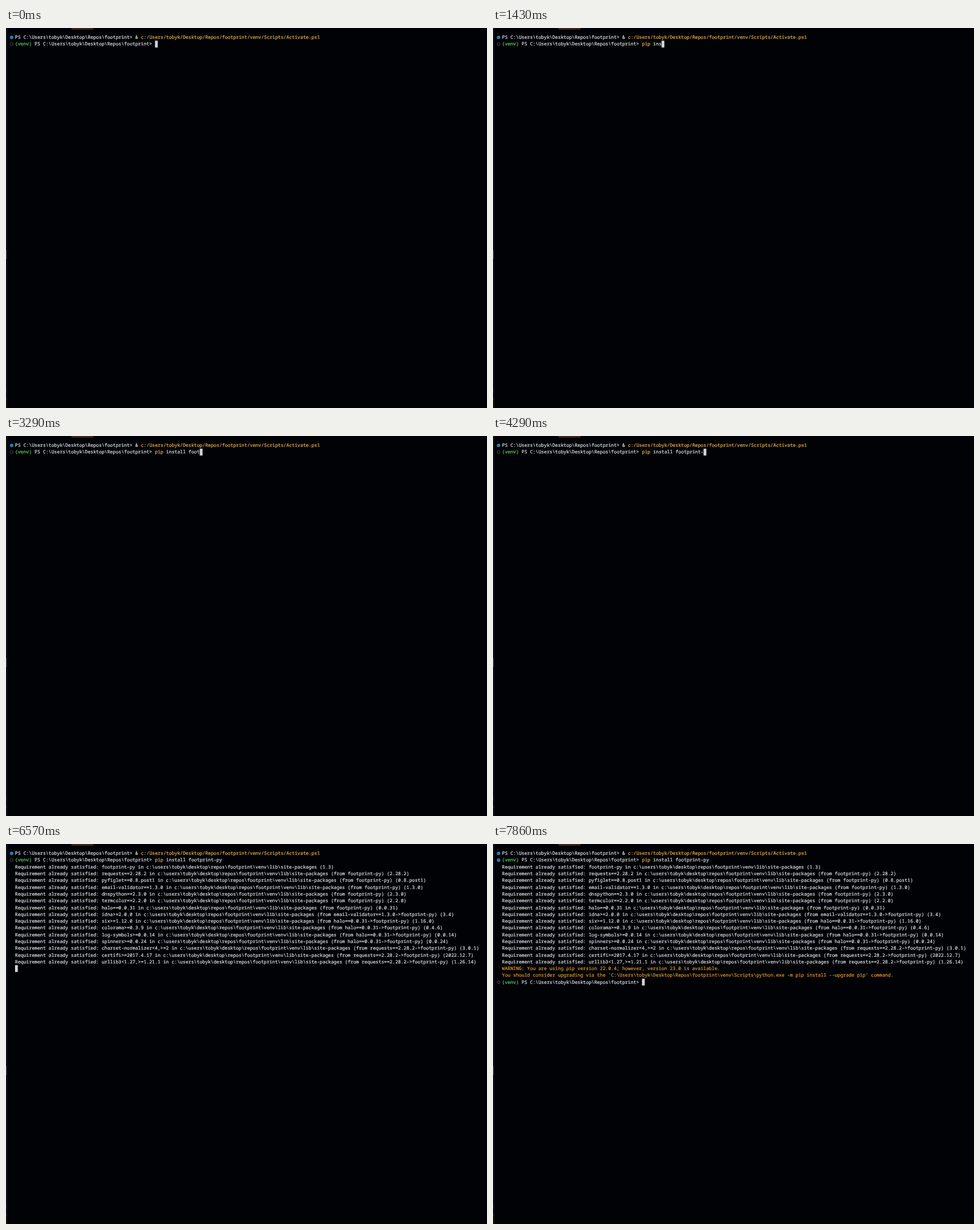
Recreate the animation shown at these times as an HTML page. Size 800 px wide and 633 px high, loop 8 s.

```html
<!DOCTYPE html>
<html lang="en">
<head>
<meta charset="utf-8">
<title>Terminal install</title>
<style>
  html, body { margin: 0; width: 100%; height: 100%; overflow: hidden; background: #010206; }
  svg { display: block; width: 800px; height: 633px; }
  text {
    font: 7.758px "Noto Sans Mono", "DejaVu Sans Mono", monospace;
    text-rendering: geometricPrecision;
    white-space: pre;
    fill: currentColor;
    stroke: currentColor;
    stroke-width: .22px;
  }
  .plain { color: #d9dee4; }
  .command { color: #e3b04a; }
  .env { color: #56d364; }
  .warn { color: #d8982f; }
  .done { fill: #2183ab; }
  .open { fill: none; stroke: #55595f; stroke-width: .8; }
  .cursor { fill: #cdd4dc; }
</style>
</head>
<body>
<svg id="stage" viewBox="0 0 800 633">
  <rect x="109" y="1" width="36.5" height="1" fill="#84503c"/>
  <rect x="1" width="1" height="633" fill="#1d2126"/>
  <rect y="370" width="1" height="15" fill="#3c4045"/>
  <rect y="603" width="1" height="2" fill="#26292e"/>
  <rect y="617" width="1" height="2" fill="#26292e"/>
</svg>
<script>
const LOOP = 8000, LEFT = 15, CELL = 4.655, ROW = 11.29, TOP = 9.9;
const stage = document.getElementById('stage');

function add(parent, tag, attrs, content = '') {
  const node = document.createElementNS('http://www.w3.org/2000/svg', tag);
  for (const key in attrs) node.setAttribute(key, attrs[key]);
  node.textContent = content;
  parent.append(node);
  return node;
}

const group = () => add(stage, 'g', {});
const colX = col => LEFT + col * CELL;
const rowY = row => TOP + row * ROW;

// Lays out [class, text] runs on the character grid.
function line(parent, row, ...runs) {
  let col = 0;
  return runs.map(([cls, text]) => {
    const node = add(parent, 'text', { class: cls, x: colX(col), y: rowY(row) + 8.3 }, text);
    col += text.length;
    return node;
  });
}

const dot = (parent, row, cls) =>
  add(parent, 'circle', { class: cls, cx: 9.3, cy: rowY(row) + 5.7, r: cls === 'done' ? 2.9 : 2.3 });

const HOME = 'C:\\Users\\tobyk\\Desktop\\Repos\\footprint';
const PROMPT = `PS ${HOME}> `;
const prompt = (parent, row, ...rest) =>
  line(parent, row, ['env', '(venv)'], ['plain', ' ' + PROMPT], ...rest);

const base = group();
dot(base, 0, 'done');
line(base, 0, ['plain', PROMPT + '& '],
  ['command', 'c:/Users/tobyk/Desktop/Repos/footprint/venv/Scripts/Activate.ps1']);
const [, , program, args] = prompt(base, 1, ['command', 'pip'], ['plain', ' install footprint-py']);
const running = dot(base, 1, 'open');

const PKG = 'footprint-py';
const HALO = `halo==0.0.31->${PKG}`;
const REQ = `requests==2.28.2->${PKG}`;
const packages = [
  [PKG, '', '1.3'],
  ['requests==2.28.2', PKG, '2.28.2'],
  ['pyfiglet==0.8.post1', PKG, '0.8.post1'],
  ['email-validator==1.3.0', PKG, '1.3.0'],
  ['dnspython==2.3.0', PKG, '2.3.0'],
  ['termcolor==2.2.0', PKG, '2.2.0'],
  ['halo==0.0.31', PKG, '0.0.31'],
  ['idna>=2.0.0', `email-validator==1.3.0->${PKG}`, '3.4'],
  ['six>=1.12.0', HALO, '1.16.0'],
  ['colorama>=0.3.9', HALO, '0.4.6'],
  ['log-symbols>=0.0.14', HALO, '0.0.14'],
  ['spinners>=0.0.24', HALO, '0.0.24'],
  ['charset-normalizer<4,>=2', REQ, '3.0.1'],
  ['certifi>=2017.4.17', REQ, '2022.12.7'],
  ['urllib3<1.27,>=1.21.1', REQ, '1.26.14']
];
const SITE = HOME.toLowerCase() + '\\venv\\lib\\site-packages';

const output = group();
packages.forEach(([name, origin, version], i) => {
  const from = origin && ` (from ${origin})`;
  line(output, i + 2, ['plain', `Requirement already satisfied: ${name} in ${SITE}${from} (${version})`]);
});

const warning = group();
line(warning, 17, ['warn', 'WARNING: You are using pip version 22.0.4; however, version 23.0 is available.']);
line(warning, 18, ['warn', `You should consider upgrading via the '${HOME}\\venv\\Scripts\\python.exe -m pip install --upgrade pip' command.`]);

const finish = group();
dot(finish, 1, 'done');
dot(finish, 19, 'open');
prompt(finish, 19);

const cursor = add(stage, 'rect', { class: 'cursor', width: CELL, height: ROW });

// [time in ms, characters typed so far]
const keys = [
  [0, 0], [290, 1], [570, 2], [860, 3], [1290, 5], [1430, 7], [1570, 8], [1710, 9],
  [1860, 10], [2000, 11], [2140, 12], [2570, 13], [2710, 15], [2860, 16],
  [3430, 17], [3570, 18], [3710, 20], [3860, 21], [4290, 22], [4860, 23], [5000, 24]
];
const ENTER = 5140, OUTPUT = 6570, WARNING = 7140, FINISH = 7290;
const INPUT_COL = 7 + PROMPT.length;
const COMMAND = 'pip install footprint-py';

const show = (node, on) => node.setAttribute('visibility', on ? 'visible' : 'hidden');

function cursorCell(t, typed) {
  if (t >= FINISH) return [INPUT_COL, 19];
  if (t >= WARNING) return [0, 19];
  if (t >= OUTPUT) return [0, 17];
  if (t >= ENTER) return [0, 2];
  return [INPUT_COL + typed, 1];
}

function draw(now) {
  const t = now % LOOP;
  const typed = keys.filter(([at]) => at <= t).pop()[1];
  program.textContent = COMMAND.slice(0, Math.min(typed, 3));
  args.textContent = COMMAND.slice(3, Math.max(typed, 3));
  show(output, t >= OUTPUT);
  show(warning, t >= WARNING);
  show(finish, t >= FINISH);
  show(running, t < FINISH);
  const [col, row] = cursorCell(t, typed);
  cursor.setAttribute('x', colX(col));
  cursor.setAttribute('y', rowY(row));
}

function tick() {
  draw(performance.now());
  requestAnimationFrame(tick);
}
tick();
</script>
</body>
</html>
```
